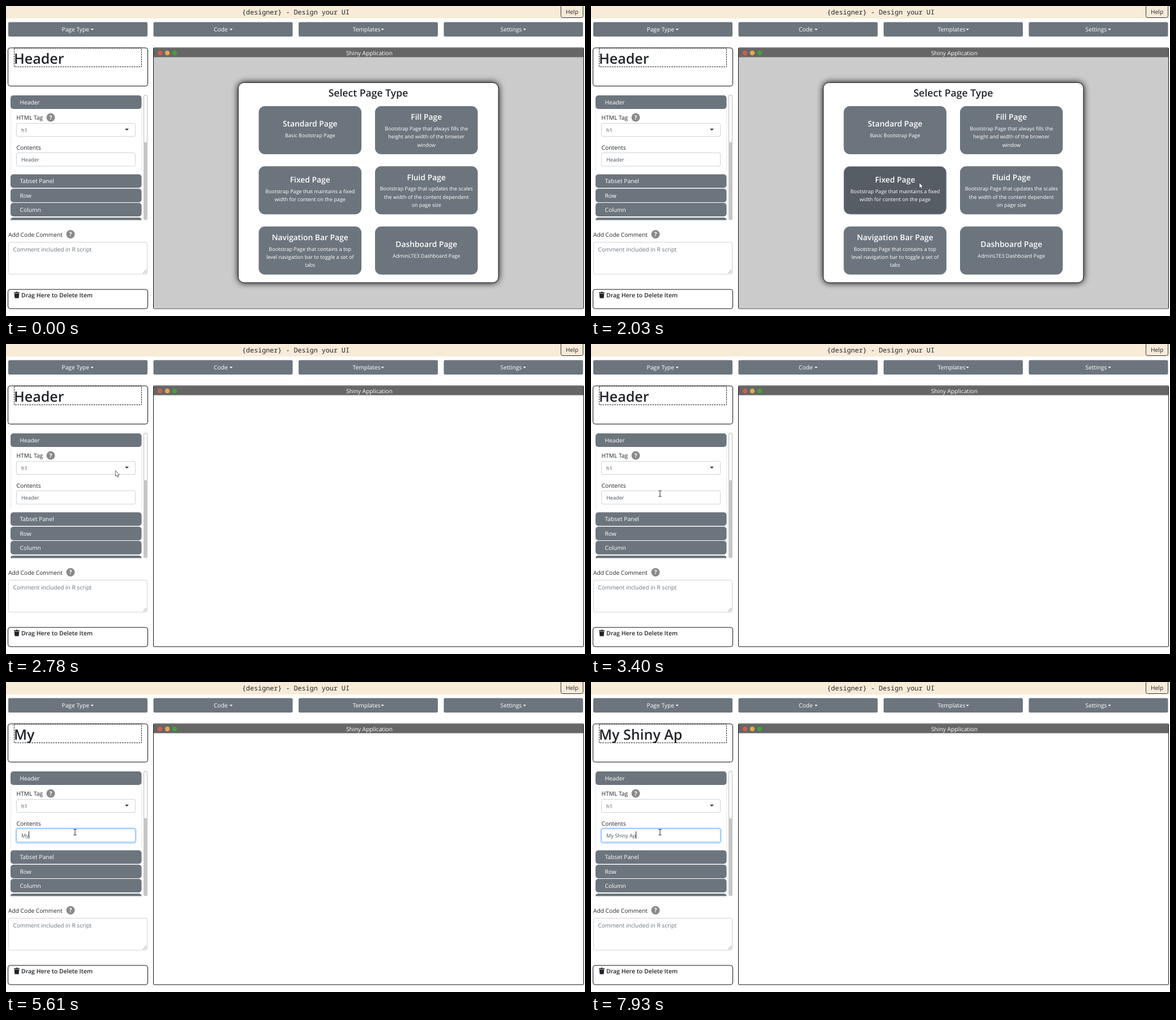
Animation, 1023 px wide and 548 px high, one loop 7990 ms. Source, as an HTML page:

```html
<!DOCTYPE html>
<html lang="en">
<head>
<meta charset="utf-8">
<title>Design your UI</title>
<style>
  html, body { margin: 0; width: 100%; height: 100%; overflow: hidden; background: #fff; }
  svg { display: block; width: 1023px; height: 548px; }
  text { font-family: "Open Sans", "Noto Sans", sans-serif; text-rendering: geometricPrecision; white-space: pre; }
</style>
</head>
<body>
<svg id="stage" viewBox="0 0 1023 548"></svg>
<script>
const GREY = '#6c757d', INK = '#212529';
const LOOP = 7990;

const text = (x, y, s, size = 10.25, fill = INK, extra = '') =>
  `<text x="${x}" y="${y}" font-size="${size}" fill="${fill}" ${extra}>${s}</text>`;
const centred = (x, y, s, size, fill, extra = '') =>
  text(x, y, s, size, fill, `text-anchor="middle" ${extra}`);
const box = (x, y, w, h, r, fill, stroke = 'none', extra = '') =>
  `<rect x="${x}" y="${y}" width="${w}" height="${h}" rx="${r}" fill="${fill}" stroke="${stroke}" ${extra}/>`;
const dot = (x, y, r, fill) => `<circle cx="${x}" cy="${y}" r="${r}" fill="${fill}"/>`;
const caretDown = (x, y, w, fill) => `<path d="M${x} ${y}h${w}l${-w / 2} ${w / 2}z" fill="${fill}"/>`;
const help = (x, y) => dot(x, y, 7.5, '#8a8a8a') +
  centred(x, y + 3.8, '?', 10.5, '#fff', 'font-weight="700"');
const SEMI = 'font-weight="600"';

function topBar() {
  const menus = [[4, 98.5, 149.5, 'Page Type'], [260.5, 367, 395, 'Code'],
    [517, 612.5, 662.5, 'Templates'], [773.5, 873.5, 913.5, 'Settings']];
  return box(0, 0, 1023, 22, 0, '#f8ebd7') +
    centred(512, 15, '{designer} - Design your UI', 11.72, INK,
      `style="font-family:'Noto Sans Mono','DejaVu Sans Mono',monospace"`) +
    box(980.5, -4, 39, 24.5, 3, 'none', '#343a40') + text(989, 14, 'Help') +
    menus.map(([x, tx, cx, s]) => box(x, 28.5, 246, 25.5, 2.5, GREY) +
      text(tx, 45, s, 10.25, '#fff') + caretDown(cx, 40.3, 5.4, '#fff')).join('');
}

function sidebar() {
  const section = (y, s) => box(8, y, 231.5, 24, 5, GREY) + text(24.5, y + 15.7, s, 10.25, '#fff');
  return box(3.5, 74, 247, 67.5, 4, '#fff', '#111') +
    text(14, 101.5, '', 25, INK, SEMI + ' id="heading"') +
    box(14.5, 74.5, 225, 33, 0, 'none', '#111', 'stroke-dasharray="2.6 1.6"') +
    '<path d="M8.5 180V293M239.5 180V293" stroke="#e6e8ea"/>' +
    section(158, 'Header') +
    text(18.5, 201, 'HTML Tag') + help(79, 197) +
    box(18.5, 207.5, 210, 23, 2.5, '#fff', '#ced4da') +
    text(27, 222.5, 'h1', 9.2, '#495057') + caretDown(210, 216.8, 7, '#343a40') +
    text(18.5, 253.5, 'Contents') +
    box(17.5, 258.5, 212, 26, 3.5, 'none', '#bfdeff', 'id="ring" stroke-width="2.4"') +
    box(18.5, 259.5, 210, 23.5, 2.5, '#fff', '#ced4da', 'id="field"') +
    box(27, 264, 31.5, 15, 0, '#4c8ff6', 'none', 'id="selection"') +
    text(27, 275, '', 9.2, '#495057', 'id="contents"') +
    box(0, 264, 1, 13, 0, '#222', 'none', 'id="caret"') +
    section(297.5, 'Tabset Panel') + section(323, 'Row') + section(348, 'Column') +
    `<path d="M8 378.5q0-4.5 5-4.5H234.5q5 0 5 4.5z" fill="${GREY}"/>` +
    box(243, 157, 7, 221.5, 3.5, '#c6c6c6') +
    box(243.5, 157.5, 6, 84.5, 3, '#fdfdfd', '#bdbdbd') +
    text(4, 408, 'Add Code Comment', 10.2) + help(114, 403.5) +
    box(4.5, 417.5, 245, 56.5, 2.5, '#fff', '#ced4da') +
    text(12.5, 433.5, 'Comment included in R script', 10.15, GREY) +
    '<path d="M242.5 472.5l6-6M246 472.5l2.5-2.5" stroke="#666" stroke-width=".8"/>' +
    box(3.5, 501, 247, 34, 4, '#fff', '#111') +
    `<path d="M14 506h3l.7-1h2.6l.7 1h3v1.4H14zM14.7 508.2h8.6l-.6 7.2q-.1 1-1.1 1h-5.2q-1 0-1.1-1z" fill="${INK}"/>` +
    text(27, 514.5, 'Drag Here to Delete Item', 10.5, INK, SEMI);
}

function card(x, y, title, ...lines) {
  const base = y + [36, 28.8, 24.3][lines.length - 1], mid = x + 90.75;
  const fixed = title === 'Fixed Page';
  return box(x, y, 181.5, 85, 11, GREY, 'none', fixed ? 'id="fixed"' : '') +
    centred(mid, base, title, 13.85, '#fff', SEMI) +
    lines.map((s, i) => centred(mid, base + 18.8 + 14.2 * i, s, 9.05, '#fff')).join('');
}

function app() {
  const [left, right] = [446.5, 652];
  return box(260.5, 74, 760, 461, 1, '#fff', '#111') +
    '<g id="modal">' + box(261, 90, 759, 444.5, 0, '#cbcbcb') +
    box(410.5, 135.5, 459.5, 353.5, 10, '#fff', '#222', 'style="filter:drop-shadow(0 0 6px #000)"') +
    centred(640, 159.5, 'Select Page Type', 17.6, INK, SEMI) +
    card(left, 177, 'Standard Page', 'Basic Bootstrap Page') +
    card(right, 177, 'Fill Page', 'Bootstrap Page that always fills the',
      'height and width of the browser', 'window') +
    card(left, 283.3, 'Fixed Page', 'Bootstrap Page that maintains a fixed',
      'width for content on the page') +
    card(right, 283.3, 'Fluid Page', 'Bootstrap Page that updates the scales',
      'the width of the content dependent', 'on page size') +
    card(left, 389.7, 'Navigation Bar Page', 'Bootstrap Page that contains a top',
      'level navigation bar to toggle a set of', 'tabs') +
    card(right, 389.7, 'Dashboard Page', 'AdminLTE3 Dashboard Page') + '</g>' +
    box(261, 74.5, 759, 16, 0, '#666') +
    dot(272, 83, 4.2, '#cb5f50') + dot(285, 83, 4.2, '#e2a94c') + dot(298, 83, 4.2, '#45a038') +
    centred(642, 86.7, 'Shiny Application', 10.25, '#fff');
}

const pointers =
  '<path id="arrow" d="M0 0V10L2.3 8 4 11.8 5.6 11 4 7.5H7Z" fill="#fff" stroke="#222" stroke-width=".7"/>' +
  '<path id="ibeam" d="M-2.5-5H-.6L0-4.5.6-5H2.5M0-4.5V4.5M-2.5 5H-.6L0 4.5.6 5H2.5" fill="none" stroke="#222"/>';

document.getElementById('stage').innerHTML = topBar() + sidebar() + app() + pointers;

const $ = Object.fromEntries([...document.querySelectorAll('#stage [id]')].map(e => [e.id, e]));
const show = (el, on) => el.setAttribute('visibility', on ? 'visible' : 'hidden');
const ramp = (t, a, b) => Math.min(1, Math.max(0, (t - a) / (b - a)));
const mix = (a, b, p) => `rgb(${a.map((v, i) => Math.round(v + (b[i] - v) * p))})`;

const TYPED = 'My Shiny Ap';
const fieldTimes = [5220, 5480, 5870, 6000, 6130, 6260, 6460, 7050, 7190, 7590, 7860];
const headingTimes = [5280, 5610, 5940, 6070, 6200, 6330, 6530, 7190, 7260, 7660, 7930];
const typedAt = (t, times) => TYPED.slice(0, times.filter(k => k <= t).length) || 'Header';

// Pointer waypoints: time, x, y
const route = [[600, 991, 524], [1360, 580, 312], [2290, 580, 312], [2860, 172, 219],
  [3050, 134, 231], [3300, 122, 264.5], [3470, 122, 264.5], [3680, 122, 265.5]];

function pointerAt(t) {
  const i = route.findIndex(p => p[0] > t);
  if (i < 0) return route[route.length - 1].slice(1);
  const [t0, x0, y0] = route[Math.max(0, i - 1)], [t1, x1, y1] = route[i];
  const p = ramp(t, t0, t1), e = p * p * (3 - 2 * p);
  return [x0 + (x1 - x0) * e, y0 + (y1 - y0) * e];
}

const FOCUS = 3500, SELECT = 4620;

function draw(t) {
  show($.modal, t < 2100);
  $.fixed.setAttribute('fill', mix([108, 117, 125], [86, 93, 101], ramp(t, 1310, 1570)));
  $.fixed.setAttribute('stroke', `rgba(200,204,208,${ramp(t, 1880, 2030)})`);

  const focus = ramp(t, FOCUS - 30, 3680);
  $.ring.setAttribute('opacity', focus);
  $.field.setAttribute('stroke', mix([206, 212, 218], [128, 189, 255], focus));

  const selected = t >= SELECT && t < fieldTimes[0];
  show($.selection, selected);
  $.contents.textContent = typedAt(t, fieldTimes);
  $.contents.setAttribute('fill', selected ? '#fff' : '#495057');
  $.heading.textContent = typedAt(t, headingTimes);

  // The caret blinks every 530 ms, counted from the latest key
  const lastKey = Math.max(FOCUS, ...fieldTimes.filter(k => k <= t));
  show($.caret, t >= FOCUS && !selected && (t - lastKey) % 1060 < 530);
  $.caret.setAttribute('x', Math.round(27 + $.contents.getComputedTextLength()));

  const [x, y] = pointerAt(t), overField = t > 2320 && y > 257 && x < 229;
  show($.arrow, t >= 600 && !overField);
  show($.ibeam, overField);
  for (const el of [$.arrow, $.ibeam]) el.setAttribute('transform', `translate(${x} ${y})`);
}

const start = performance.now();
function tick() {
  draw((performance.now() - start) % LOOP);
  requestAnimationFrame(tick);
}
tick();
</script>
</body>
</html>
```
